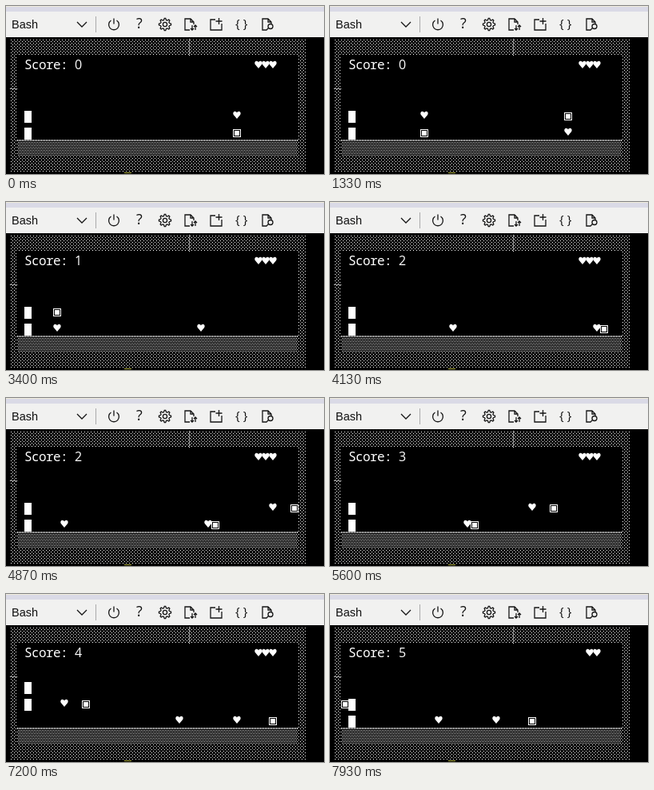
An HTML page for the animation above (8000 ms loop, 398 px wide and 210 px high).

```html
<!DOCTYPE html>
<html lang="en">
<head>
<meta charset="utf-8">
<title>Terminal runner</title>
<style>
  html, body { margin: 0; width: 100%; height: 100%; overflow: hidden; background: #000; }
  svg { display: block; width: 398px; height: 210px; }
  .icons { fill: none; stroke: #161616; stroke-width: 1.3; }
  .label { font: 14.5px "Liberation Sans", Arial, sans-serif; fill: #111; }
  .help { font: 18px "Open Sans", sans-serif; fill: #111; }
  .braces { font: 15px "Open Sans", sans-serif; fill: #111; }
  .score { font: 16px "Noto Sans Mono", "DejaVu Sans Mono", monospace; letter-spacing: -.6px; fill: #fff; white-space: pre; }
  .digit { font-family: "Open Sans", sans-serif; }
</style>
</head>
<body>
<svg viewBox="0 0 398 210">
  <defs>
    <pattern id="light" width="4" height="4" patternUnits="userSpaceOnUse">
      <path d="M0 0h1v1h-1zM2 2h1v1h-1z" fill="#fff" shape-rendering="crispEdges"/>
    </pattern>
    <pattern id="medium" width="2" height="4" patternUnits="userSpaceOnUse">
      <path d="M0 0h1v1h-1zM1 2h1v1h-1z" fill="#fff" shape-rendering="crispEdges"/>
    </pattern>
    <path id="heart" d="M0 5L-4 .3C-5.400-1.600-4.500-4.300-2.400-4.300C-1.200-4.300-.4-3.500 0-2.500C.4-3.500 1.200-4.300 2.400-4.300C4.500-4.300 5.400-1.600 4 .3Z" fill="#fff"/>
    <g id="box">
      <rect x="-5" y="-5" width="10" height="10" fill="#000"/>
      <rect x="-4.5" y="-4.5" width="9" height="9" fill="none" stroke="#fff"/>
      <rect x="-3" y="-3" width="6" height="6" fill="#fff"/>
    </g>
  </defs>

  <rect width="398" height="39" fill="#f1f1f0"/>
  <rect width="398" height="7" fill="#dadae6"/>
  <rect width="398" height="1" fill="#eeeadb"/>

  <text class="label" x="7" y="27.500">Bash</text>
  <text class="help" x="163" y="27.500">?</text>
  <text class="braces" x="287" y="27" letter-spacing="4">{}</text>
  <g class="icons">
    <path d="M89 20l6 6l6-6"/>
    <path d="M112.500 13v20" stroke="#aaa" stroke-width="1"/>
    <path d="M131.500 18a6.400 6.400 0 1 0 7 0M135 15.500v7"/>
    <path id="gear"/>
    <circle cx="199" cy="23" r="2.600"/>
    <path d="M230 30h-6v-14h7l4 4v3M231 16v4h4M233 30v-6m-2 4l2 2l2-2M237 30v-6m-2 2l2-2l2 2"/>
    <path d="M262 17h-6v13h14v-8M266.500 15v8M262.500 19h8"/>
    <path d="M326 30h-5v-14h7l4 4v2M328 16v4h4M328.500 27.500l-3 3"/>
    <circle cx="331" cy="25.500" r="3"/>
  </g>

  <rect y="39" width="398" height="171" fill="#000"/>
  <rect x="5" y="41" width="371" height="167" fill="url(#light)"/>
  <rect x="14" y="62" width="351" height="105" fill="#000"/>
  <rect x="14" y="167" width="351" height="21" fill="#000"/>
  <rect x="14" y="167" width="351" height="21" fill="url(#medium)"/>
  <path d="M14 167.500h351" stroke="#fff" stroke-dasharray="1 1"/>
  <path d="M229.500 41v21M5 103.500h9" stroke="#fff" stroke-dasharray="1 1"/>
  <path d="M148 208.500h9" stroke="#a8a83a"/>

  <text class="score" x="23" y="79">Score: <tspan id="score" class="digit"></tspan></text>
  <g id="lives"></g>
  <g id="things"></g>
  <rect id="head" x="23" width="9" height="15" fill="#fff"/>
  <rect id="feet" x="23" width="9" height="15" fill="#fff"/>
</svg>
<script>
const LOOP = 8000, FPS = 15, LAST_STEP = 119;
const CELL = 9, ROW = 21, ORIGIN = 28;
const BASE = { heart: 157, box: 159 };
const $ = id => document.getElementById(id);

// [picture step, columns scrolled]
const scroll = [[0, 0], [20, 19], [34, 31], [51, 45], [73, 64], [96, 83], [LAST_STEP, 102]];

// [shape, column at start, height above ground]
const items = [
  ["heart", 29, 1], ["box", 29, 0],
  ["box", 49, 1], ["heart", 49, 0],
  ["heart", 69, 0],
  ["heart", 89, 0], ["box", 90, 0],
  ["heart", 98, 1], ["box", 101, 1],
  ["heart", 114, 0], ["heart", 122, 0], ["box", 127, 0]
];
const between = (v, from, to) => v >= from && v < to;

function add(parent, shape, x, y) {
  const node = document.createElementNS("http://www.w3.org/2000/svg", "use");
  node.setAttribute("href", "#" + shape);
  place(node, x, y);
  return $(parent).appendChild(node);
}
function place(node, x, y) {
  node.setAttribute("transform", `translate(${x} ${y})`);
}
function show(node, on) {
  node.style.display = on ? "" : "none";
}

const teeth = Array.from({ length: 32 }, (_, i) => {
  const r = i % 4 < 2 ? 7.6 : 5.6, a = (i - 0.5) * Math.PI / 16;
  return `${(199 + r * Math.cos(a)).toFixed(2)} ${(23 + r * Math.sin(a)).toFixed(2)}`;
});
$("gear").setAttribute("d", `M${teeth.join("L")}Z`);

const lives = [316, 325, 334].map(x => add("lives", "heart", x, 73));
const nodes = items.map(([shape]) => add("things", shape, 0, 0));

function columnsAt(step) {
  const i = Math.max(1, scroll.findIndex(([s]) => s >= step));
  const [s0, c0] = scroll[i - 1], [s1, c1] = scroll[i];
  return Math.round(c0 + (c1 - c0) * (step - s0) / (s1 - s0));
}

function draw(time) {
  const step = Math.min(LAST_STEP, Math.floor(time * FPS / 1000 + 0.06));
  const moved = columnsAt(step);
  let score = 0;

  items.forEach(([shape, start, up], i) => {
    const col = start - moved, isHeart = shape === "heart";
    if (isHeart && col <= -3) score++;
    show(nodes[i], between(col, isHeart ? 1 : -1, 38));
    place(nodes[i], ORIGIN + CELL * col, BASE[shape] - ROW * up);
  });

  const jump = between(moved, 28, 33) || between(moved, 90, 95) ? ROW : 0;
  $("head").setAttribute("y", 131 - jump);
  $("feet").setAttribute("y", 152 - jump);
  show($("head"), !between(moved, 47, 51));
  show(lives[0], moved < 101);
  $("score").textContent = score;
}

function tick(now) {
  draw(now % LOOP);
  requestAnimationFrame(tick);
}
draw(0);
requestAnimationFrame(tick);
</script>
</body>
</html>
```
